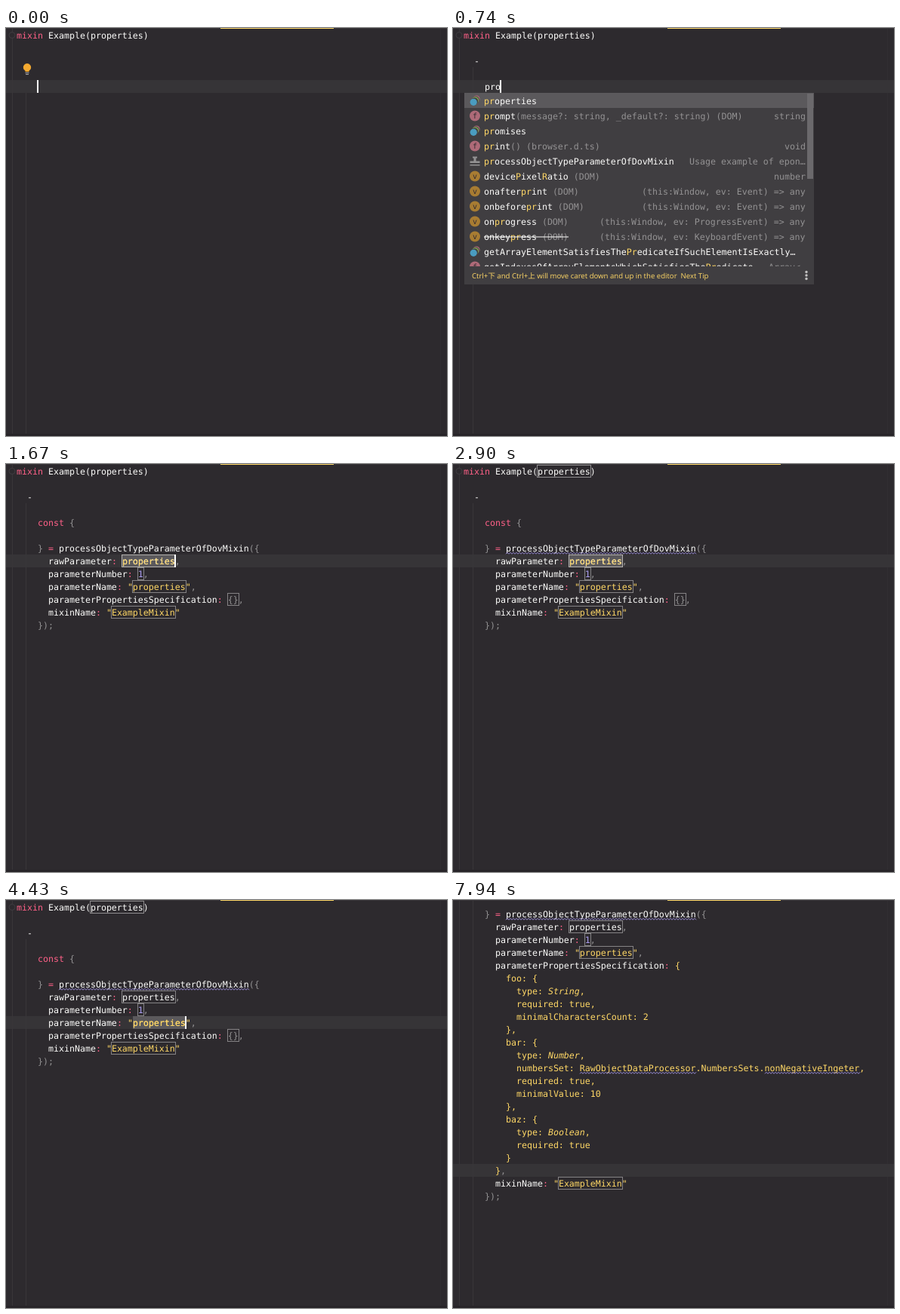
Recreate the animation shown at these times as an HTML page. Size 584 by 541 pixels, loop 8000 ms.

```html
<!DOCTYPE html>
<html lang="en">
<head>
<meta charset="utf-8">
<title>Editor template</title>
<style>
html, body { margin: 0; width: 100%; height: 100%; overflow: hidden; background: #2d2a2e; }
svg { display: block; width: 584px; height: 541px; }
text { white-space: pre; text-rendering: geometricPrecision; }
.code { font: 11.627px "DejaVu Sans Mono", "Liberation Mono", monospace; }
.tip { font: 9.6px "Open Sans", "Noto Sans CJK JP", "Noto Sans CJK SC", sans-serif; }
.badge { font: 10px "DejaVu Sans Mono", monospace; text-anchor: middle; }
</style>
</head>
<body>
<svg id="stage" viewBox="0 0 584 541"></svg>
<script>
const LOOP = 8000, CELL = 7, LEFT = 14, LINE = 17;
const C = {
  bg: '#2d2a2e', row: '#363437', guide: '#393639', panel: '#403e41', pick: '#5b595c',
  white: '#fcfcfa', grey: '#939293', pink: '#ff6188', yellow: '#ffd866', purple: '#ab9df2'
};
const FUNC = 'processObjectTypeParameterOfDovMixin';
const stage = document.getElementById('stage');

const lineTop = n => 1 + n * LINE;
const colX = c => LEFT + c * CELL;
const within = (t, a, b) => t >= a && t < b;
const esc = s => s.replace(/&/g, '&amp;').replace(/</g, '&lt;').replace(/>/g, '&gt;');
const rect = (x, y, w, h, fill, extra = '') =>
  `<rect x="${x}" y="${y}" width="${w}" height="${h}" fill="${fill}" ${extra}/>`;
const span = (s, fill, extra = '') => `<tspan fill="${fill}" ${extra}>${esc(s)}</tspan>`;
const text = (x, y, body, extra = '') => `<text class="code" x="${x}" y="${y}" ${extra}>${body}</text>`;
const frameBox = (line, col, n, color = '#858385') =>
  rect(colX(col) - .5, lineTop(line) + .5, n * CELL + 1, 16, 'none', `stroke="${color}"`);
const caret = (line, col) => rect(colX(col) - 1, lineTop(line), 2, LINE, '#fff');

function wave(line, col, n) {
  const x = colX(col), y = lineTop(line) + 16.3;
  let d = `M${x} ${y}`;
  for (let i = 1; i <= n * CELL / 2; i++) d += `L${x + i * 2} ${y - (i % 2) * 2}`;
  return `<path d="${d}" fill="none" stroke="${C.purple}" stroke-width=".9"/>`;
}

function tint(token) {
  if (/^"/.test(token)) return C.yellow;
  if (/^(const|mixin|=|:)$/.test(token)) return C.pink;
  if (/^\d/.test(token)) return C.purple;
  return /^[{}(),;]/.test(token) ? C.grey : C.white;
}

function code(line, col, src, color) {
  const body = color ? span(src, color)
    : src.match(/"[^"]*"|\w+|\s+|./g).map(s => span(s, tint(s))).join('');
  return text(colX(col), lineTop(line) + 13, body);
}

// Editable template slots: line, column, text
const SLOTS = {
  raw: [7, 20, 'properties'],
  num: [8, 23, '1'],
  name: [9, 22, 'properties'],
  spec: [10, 40, '{}'],
  mixin: [11, 18, 'ExampleMixin']
};

const NESTED = [
  '  foo: {', '    type: String,', '    required: true,', '    minimalCharactersCount: 2', '  },',
  '  bar: {', '    type: Number,',
  '    numbersSet: RawObjectDataProcessor.NumbersSets.nonNegativeIngeter,',
  '    required: true,', '    minimalValue: 10', '  },',
  '  baz: {', '    type: Boolean,', '    required: true', '  }'
];

function template(active, wavy, specEnd = '{},') {
  let s = '';
  if (active) {
    const [line, col, str] = SLOTS[active];
    s += rect(colX(col), lineTop(line), str.length * CELL, LINE, C.pick);
  }
  s += code(4, 4, 'const {') + code(6, 4, `} = ${FUNC}({`)
    + code(7, 6, 'rawParameter: properties,') + code(8, 6, 'parameterNumber: 1,')
    + code(9, 6, 'parameterName: "properties",')
    + code(10, 6, 'parameterPropertiesSpecification: ' + specEnd);
  if (wavy) s += wave(6, 8, FUNC.length);
  for (const key in SLOTS) {
    const [line, col, str] = SLOTS[key];
    if (key === 'mixin' || (key === 'spec' && !specEnd)) continue;
    if (key === active) {
      s += code(line, col, str, C.yellow);
      if (key === 'raw') s += frameBox(line, col, str.length, '#b5b3b0');
    } else s += frameBox(line, col, str.length);
  }
  return s;
}

function ending(line) {
  return code(line, 6, 'mixinName: "ExampleMixin"') + frameBox(line, 18, 12) + code(line + 1, 4, '});');
}

function nested(semantic) {
  let s = code(10, 40, '{', C.yellow);
  NESTED.forEach((src, i) => {
    const line = 11 + i, m = src.match(/^(\s*type: )(\w+)(,)$/);
    if (m && semantic) {
      s += text(colX(6), lineTop(line) + 13, span(m[1], C.yellow)
        + span(m[2], C.yellow, 'font-style="italic"') + span(m[3], C.yellow));
    } else s += code(line, 6, src, C.yellow);
  });
  if (semantic) s += wave(18, 22, 22) + wave(18, 57, 18);
  return s + code(26, 6, '}', C.yellow) + code(26, 7, ',');
}

function icon(kind, x, y) {
  const dot = (dx, dy, r, fill) =>
    `<circle cx="${x + dx}" cy="${y + dy}" r="${r}" fill="${fill}"/>`;
  if (kind === 'o') {
    return dot(2, -2.4, 4.6, '#b06a78') + dot(1.2, -1.4, 4.6, C.panel)
      + dot(.7, -.8, 4.5, '#7fa556') + dot(-.3, .4, 4.5, C.panel) + dot(-1.8, 1.8, 4.6, '#4a9cc0');
  }
  if (kind === 't') {
    return rect(x - 3, y - 6, 6, 2, C.grey) + rect(x - 1.5, y - 5, 3, 6, C.grey)
      + rect(x - 6.5, y, 13, 2.5, C.grey) + rect(x - 6.5, y + 4.5, 13, 1.5, C.grey);
  }
  return dot(0, 0, 7, kind === 'f' ? '#ae6a78' : '#a87c32')
    + `<text class="badge" x="${x}" y="${y + 3.4}" fill="#332c30">${kind}</text>`;
}

// Rows: icon, label, faded suffix, right column
const EV = type => `(this:Window, ev: ${type}) => any`;
const ROWS = [
  ['o', 'properties', '', ''],
  ['f', 'prompt', '(message?: string, _default?: string) (DOM)', 'string'],
  ['o', 'promises', '', ''],
  ['f', 'print', '() (browser.d.ts)', 'void'],
  ['t', FUNC, '', 'Usage example of epon…'],
  ['v', 'devicePixelRatio', ' (DOM)', 'number'],
  ['v', 'onafterprint', ' (DOM)', EV('Event')],
  ['v', 'onbeforeprint', ' (DOM)', EV('Event')],
  ['v', 'onprogress', ' (DOM)', EV('ProgressEvent')],
  ['v', 'onkeypress', ' (DOM)', EV('KeyboardEvent')],
  ['o', 'getArrayElementSatisfiesThePredicateIfSuchElementIsExactly…', '', ''],
  ['f', 'getIndexesOfArrayElementsWhichSatisfiesThePredicate', '', 'Array<…']
];

function label(str, prefix) {
  const at = prefix ? str.toLowerCase().indexOf(prefix) : 0;
  if (at < 0) return str.split(/([PR])/).map(p => span(p, /^[PR]$/.test(p) ? C.yellow : C.white)).join('');
  const end = at + prefix.length;
  return span(str.slice(0, at), C.white) + span(str.slice(at, end), C.yellow) + span(str.slice(end), C.white);
}

function popup(x, y, w, listH, rows, prefix) {
  const right = x + w, foot = y + listH;
  let s = rect(x, y, w, listH + 24, C.panel) + rect(x, y, w, 20, C.pick);
  rows.forEach(([kind, name, suffix, side], i) => {
    const cy = y + 10.5 + i * 20, strike = name === 'onkeypress';
    if (kind) s += icon(kind, x + 14, cy);
    s += text(x + 26, cy + 4.5, label(name, prefix) + span(suffix, C.grey));
    if (strike) s += rect(x + 26, cy, (name + suffix).length * CELL, 1, C.white);
    if (side) s += text(right - 11 - side.length * CELL, cy + 4.5, span(side, C.grey));
  });
  s += rect(x, foot, w, 24, C.panel);
  s += `<text class="tip" x="${x + 10}" y="${foot + 15.6}" fill="${C.yellow}">`
    + 'Ctrl+下 and Ctrl+上 will move caret down and up in the editor\u00a0\u00a0Next Tip</text>';
  for (const dy of [7.5, 12, 16.5])
    s += `<circle cx="${right - 10}" cy="${foot + dy}" r="1.7" fill="#c1c0c0"/>`;
  return `<g>${s}</g>`;
}

function bulb() {
  return rect(18, 44, 20, 24, C.bg)
    + '<path d="M25.5 58v-1.2a5.2 5.2 0 1 1 5 0V58z" fill="#f4a930"/>'
    + rect(25.5, 59, 5, 1, '#b0aeb0') + rect(26, 61, 4, 1, '#b0aeb0');
}

function background(activeTop, guideTop) {
  return rect(0, 0, 584, 541, C.bg) + rect(575, 0, 1, 541, '#312e32')
    + rect(0, activeTop, 584, LINE, C.row)
    + rect(8, 0, 1, 541, C.guide) + rect(26, guideTop, 1, 541 - guideTop, C.guide);
}

function chrome() {
  return rect(0, 0, 584, 1, '#373438') + rect(284, 0, 150, 1, C.yellow) + rect(0, 538, 584, 3, '#272428');
}

function header(occurrence) {
  return `<circle cx="8" cy="9.5" r="4" fill="${C.bg}" stroke="#403d41"/>`
    + code(0, 0, 'mixin Example(properties)'.slice(0, 5))
    + code(0, 6, 'Example(properties)', C.white) + code(2, 2, '-', C.white)
    + (occurrence ? frameBox(0, 14, 10, '#8f8d8f') : '');
}

function typing(t) {
  const stops = [400, 600, 740, 860, 1070, 1220];
  const word = 'proces'.slice(0, stops.filter(at => t >= at).length);
  const idle = t < 400;
  let s = background(lineTop(4), idle ? 86 : 52) + header(false);
  if (idle) s += bulb();
  if (word) s += code(4, 4, word, C.white);
  s += caret(4, 4 + word.length);
  if (within(t, 600, 860))
    s += popup(15, 86, 463, 230, ROWS, 'pr') + rect(469, 87, 8, 113, '#6b696c');
  if (t >= 860) {
    const hit = t < 1070 ? 4 : t < 1290 ? 5 : 6;
    s += popup(15, 86, 500, 20, [['t', FUNC, '', 'Usage example of eponymous…']], 'proces'.slice(0, hit));
  }
  return s;
}

const HIDDEN = [[2900, 2980], [3900, 4280], [5400, 5810], [6420, 6590], [7940, 8000]];

function filling(t) {
  const key = t < 2980 ? 'raw' : t < 4280 ? 'num' : t < 5810 ? 'name' : 'spec';
  const [line, col, str] = SLOTS[key];
  let s = background(lineTop(line), 52)
    + header(within(t, 1730, 3040) || within(t, 4430, 5810))
    + template(key, t >= 2060) + ending(11);
  if (!HIDDEN.some(([a, b]) => within(t, a, b))) s += caret(line, col + str.length);
  if (within(t, 3040, 4280))
    s += popup(63, 154, 337, 60, ['1', '2', '3'].map(n => ['', n, '', '']), '');
  return s;
}

function expanded(t) {
  const shift = -93;
  let s = template('', true, '') + nested(t >= 6960) + ending(27);
  if (t < 7940) s += caret(26, 7);
  return background(lineTop(26) + shift, 0) + `<g transform="translate(0 ${shift})">${s}</g>`;
}

let shown = '';
function draw(now) {
  const t = now % LOOP;
  const scene = t < 1670 ? typing(t) : t < 6590 ? filling(t) : expanded(t);
  const next = scene + chrome();
  if (next !== shown) stage.innerHTML = shown = next;
}

const start = performance.now();
function tick() {
  draw(performance.now() - start);
  requestAnimationFrame(tick);
}
tick();
</script>
</body>
</html>
```
